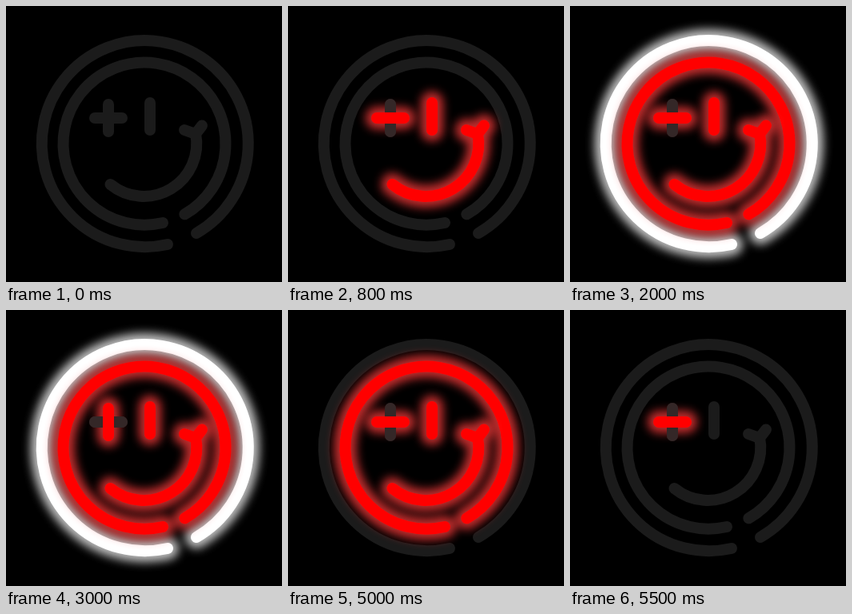
An HTML page that plays this animation: 345x345 px, repeating every 5.6 s.

```html
<!DOCTYPE html>
<html lang="en">
<head>
<meta charset="utf-8">
<title>Neon smile</title>
<style>
html, body { margin: 0; width: 100%; height: 100%; overflow: hidden; background: #000; }
svg { display: block; width: 100vw; height: 100vh; }
path { fill: none; stroke-width: 14; stroke-linecap: round; stroke-linejoin: round; }
.glow { stroke-width: 28; opacity: .75; filter: url(#blur); }
</style>
</head>
<body>
<svg id="stage" viewBox="0 0 345 345">
  <defs>
    <filter id="blur" filterUnits="userSpaceOnUse" x="0" y="0" width="345" height="345" color-interpolation-filters="sRGB">
      <feGaussianBlur stdDeviation="6"/>
    </filter>
  </defs>
</svg>
<script>
const LOOP = 5600;
const RED = '#f00', RED_GLOW = '#ff3c3c', WHITE = '#fff';
const UNLIT = '#1b1b1b', UNLIT_WARM = '#342727';
const stage = document.getElementById('stage');

// Tubes from back to front
const tubes = {
  outer: 'M202 298A129 129 0 1 1 238 284',
  inner: 'M196 271A101.5 101.5 0 1 1 223.3 260.3',
  smile: 'M130.5 223A66 66 0 0 0 237 159M223 155L237 160L245 149.5',
  eye: 'M180 121V155',
  flat: 'M111 140H145',
  tall: 'M128 123V157'
};
const crossing = { flat: 'tall', tall: 'flat' };

function add(parent, tag, attrs) {
  const node = document.createElementNS('http://www.w3.org/2000/svg', tag);
  for (const key in attrs) node.setAttribute(key, attrs[key]);
  return parent.appendChild(node);
}

for (const name in tubes) add(stage, 'path', { d: tubes[name], stroke: UNLIT });

const lit = {};
for (const name in tubes) {
  const [stroke, halo] = name === 'outer' ? [WHITE, WHITE] : [RED, RED_GLOW];
  const group = lit[name] = add(stage, 'g', {});
  add(group, 'path', { d: tubes[name], stroke: halo, class: 'glow' });
  if (crossing[name]) add(group, 'path', { d: tubes[crossing[name]], stroke: UNLIT_WARM });
  add(group, 'path', { d: tubes[name], stroke });
}

const face = 'flat eye smile inner';
const wink = face + ' outer';
const open = 'tall eye smile inner outer';
const steps = [
  [0, ''],
  [200, 'flat'],
  [400, 'flat eye'],
  [600, 'flat eye inner'],
  [800, 'flat eye smile'],
  [1000, open],
  [2000, wink],
  [3000, open],
  [4000, wink],
  [5000, face],
  [5100, wink],
  [5200, face],
  [5300, wink],
  [5400, face],
  [5500, 'flat']
];

function draw(time) {
  const [, names] = steps.filter(([start]) => start <= time).pop();
  const on = names.split(' ');
  for (const name in lit) lit[name].style.display = on.includes(name) ? '' : 'none';
}

const began = performance.now();
function tick() {
  draw((performance.now() - began) % LOOP);
  requestAnimationFrame(tick);
}
tick();
</script>
</body>
</html>
```
